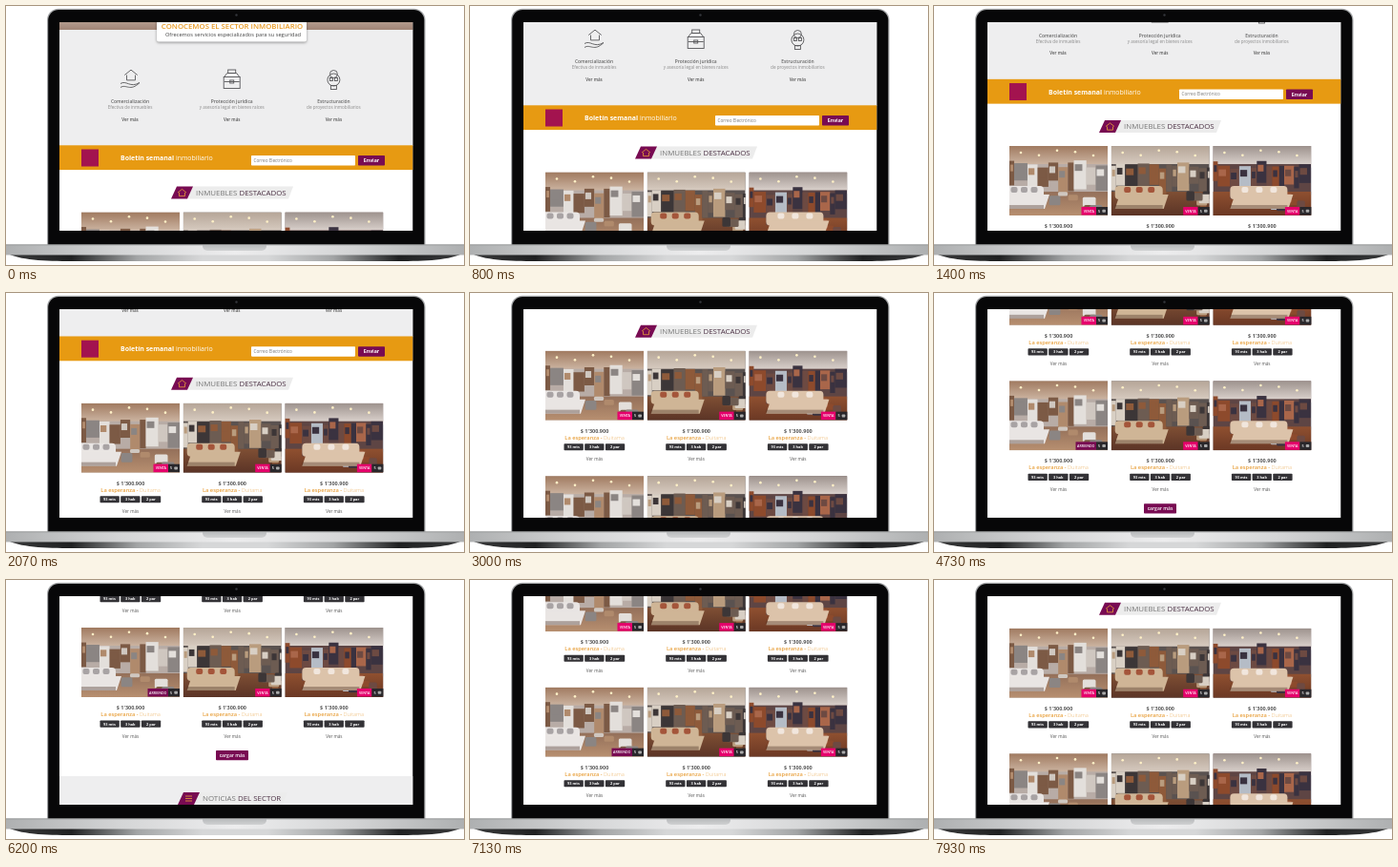
Write an HTML page with a canvas that moves like this. It is 480 px wide and 272 px high and loops after 8 s.

```html
<!DOCTYPE html>
<html lang="es">
<head>
<meta charset="utf-8">
<title>Inmuebles</title>
<style>
html, body { margin: 0; width: 100%; height: 100%; overflow: hidden; background: #fff; }
canvas { display: block; width: 480px; height: 272px; }
</style>
</head>
<body>
<canvas id="stage" width="480" height="272"></canvas>
<script>
const g = document.getElementById('stage').getContext('2d');
const LOOP = 8000, TICKS = 120, STEP = LOOP / TICKS;
const PURPLE = '#780b52', PINK = '#e6006c', ORANGE = '#e79a12', DARK = '#333236', GREY = '#eeeeef';
const SCREEN = { x: 56, y: 17, w: 370.5, h: 219 };
const CARD = { w: 103, h: 73, dx: 106.7, dy: 131.5 };
const columnX = i => 130.5 + i * CARD.dx;

// Scroll: time and place of the first row of cards
const PATH = [[0, 216.5], [800, 174.5], [2070, 115.5], [3870, 7.5], [4730, -39],
  [5700, -92], [6200, -81.5], [7930, 50.5]];

function slope(i) {
  const a = PATH[i], b = PATH[i + 1];
  return a && b ? (b[1] - a[1]) / (b[0] - a[0]) : undefined;
}

function tangent(i) {
  const a = slope(i - 1) ?? slope(i), b = slope(i) ?? a;
  return a * b <= 0 ? 0 : 2 * a * b / (a + b);
}

function scrollAt(t) {
  let i = 0;
  while (i < PATH.length - 2 && t > PATH[i + 1][0]) i++;
  const [t0, y0] = PATH[i], [t1, y1] = PATH[i + 1];
  const d = t1 - t0, u = (t - t0) / d, v = 1 - u;
  return y0 * (1 + 2 * u) * v * v + d * tangent(i) * u * v * v
    + y1 * u * u * (3 - 2 * u) - d * tangent(i + 1) * u * u * v;
}

function rect(x, y, w, h, color) {
  g.fillStyle = color;
  g.fillRect(x, y, w, h);
}

function round(x, y, w, h, r, color) {
  g.fillStyle = color;
  g.beginPath();
  g.roundRect(x, y, w, h, r);
  g.fill();
}

function slanted(x, y, w, h, lean, color) {
  g.fillStyle = color;
  g.beginPath();
  g.moveTo(x + lean, y);
  g.lineTo(x + w, y);
  g.lineTo(x + w - lean, y + h);
  g.lineTo(x, y + h);
  g.fill();
}

function line(...p) {
  g.beginPath();
  for (let i = 0; i < p.length; i += 2) g.lineTo(p[i], p[i + 1]);
  g.stroke();
}

function dot(x, y, r, color) {
  g.fillStyle = color;
  g.beginPath();
  g.arc(x, y, r, 0, 7);
  g.fill();
}

function fill(gradient, colors) {
  colors.forEach((c, i) => gradient.addColorStop(i / (colors.length - 1), c));
  return gradient;
}
const down = (y0, y1, ...colors) => fill(g.createLinearGradient(0, y0, 0, y1), colors);
const across = (...colors) => fill(g.createLinearGradient(0, 0, 480, 0), colors);

function clipped(x, y, w, h, paint) {
  g.save();
  g.beginPath();
  g.rect(x, y, w, h);
  g.clip();
  paint();
  g.restore();
}

// Runs are [text, weight, colour]; y is the middle of the capitals
function text(x, y, size, align, ...runs) {
  const font = w => `${w} ${size}px "Open Sans", "Noto Sans", sans-serif`;
  const widths = runs.map(([s, w]) => (g.font = font(w), g.measureText(s).width));
  if (align === 'center') x -= widths.reduce((a, b) => a + b) / 2;
  runs.forEach(([s, w, color], i) => {
    g.font = font(w);
    g.fillStyle = color;
    g.fillText(s, x, y + size * 0.36);
    x += widths[i];
  });
}

function seeded(n) {
  return () => (n = n * 16807 % 2147483647) / 2147483647;
}

const ROOMS = [
  { seed: 411, ceiling: ['#a07a60', '#cbb3a0'], wall: '#b8aca6', floor: ['#94705a', '#b78f70'],
    tones: ['#8b8583', '#e3dfdb', '#7c5a45', '#cfc7c0', '#b08a6c'],
    seat: { x: -6, w: 42, color: '#e9e5e3', pillow: '#a8a3a4' } },
  { seed: 902, ceiling: ['#b5a597', '#d6cabf'], wall: '#5a5250', floor: ['#7f4f34', '#5b3426'],
    tones: ['#3c3637', '#8e5a3a', '#b99c7e', '#d8cfc4', '#6d5c52'],
    seat: { x: 4, w: 50, color: '#cfb596', pillow: '#a4553a' } },
  { seed: 77, ceiling: ['#9d928d', '#d8cfca'], wall: '#5e4544', floor: ['#8f5030', '#6b3824'],
    tones: ['#3a3240', '#8d4a2c', '#b5bcc6', '#6d4a42', '#a9664a'],
    seat: { x: 18, w: 60, color: '#dcc3aa', pillow: '#f1e6dd' } }
];

function room({ seed, ceiling, wall, floor, tones, seat }) {
  const rnd = seeded(seed), { w, h } = CARD;
  rect(0, 0, w, h, wall);
  rect(0, 0, w, 19, down(0, 19, ...ceiling));
  rect(0, 48, w, h - 48, down(48, h, ...floor));
  for (let x = 0; x < w;) {
    const pw = 5 + rnd() * 9, top = 15 + rnd() * 9;
    rect(x, top, pw, 18 + rnd() * 14, tones[Math.floor(rnd() * tones.length)]);
    rect(x + 1, top + 4, pw * 0.6, 7, tones[Math.floor(rnd() * tones.length)]);
    x += pw;
  }
  for (let i = 0; i < 6; i++) {
    round(40 + rnd() * 56, 46 + rnd() * 18, 6 + rnd() * 8, 4 + rnd() * 6, 1.5, tones[i % tones.length]);
  }
  round(seat.x, 42, seat.w, 14, 4, seat.color);
  slanted(seat.x, 51, seat.w + 6, 15, 5, seat.color);
  rect(seat.x, 62, seat.w, 4, 'rgba(60,35,25,.35)');
  for (let i = 1; i < 4; i++) round(seat.x + i * seat.w / 4 - 3, 43, 7, 6, 2, seat.pillow);
  for (let i = 0; i < 5; i++) dot(12 + i * 19, 7 + 3 * Math.sin(i * 2), 1.3, '#fff0c6');
}

function pills(cx, y) {
  ['93 mts', '3 hab', '2 par'].forEach((s, i) => {
    const x = cx - 32 + i * 21.7;
    round(x, y, 20.3, 7.2, 0.8, DARK);
    text(x + 10, y + 3.6, 3.9, 'center', [s, 700, '#fff']);
  });
}

function card(col, y, rented) {
  const cx = columnX(col), x = cx - CARD.w / 2, right = x + CARD.w;
  g.save();
  g.translate(x, y);
  clipped(0, 0, CARD.w, CARD.h, () => room(ROOMS[col]));
  g.restore();

  const w = rented ? 21.5 : 15.5, mark = right - 12;
  rect(mark - w, y + 64, w, 8.5, rented ? PURPLE : PINK);
  rect(mark, y + 64, 12, 8.5, '#29272b');
  text(mark - w / 2, y + 68.3, 3.6, 'center', [rented ? 'ARRIENDO' : 'VENTA', 600, '#fff']);
  text(mark + 2, y + 68.3, 3.8, 'left', ['5', 600, '#fff']);
  round(mark + 6.3, y + 66.8, 3.6, 3, 0.8, '#aaa');

  text(cx, y + 84, 5.5, 'center', ["$ 1'300.900", 700, '#555']);
  text(cx, y + 91, 5.7, 'center', ['La esperanza - ', 600, '#e8a03c'], ['Duitama', 300, '#ecb468']);
  pills(cx, y + 97.5);
  text(cx, y + 114, 4.6, 'center', ['Ver más', 400, '#555']);
}

function heading(x, y, w, light, strong, icon) {
  slanted(x + 17, y, w - 17, 13, 5, '#ececec');
  slanted(x, y, 23, 13, 6, PURPLE);
  pen('#e9a339', 0.8);
  icon(x + 11.5, y + 6.5);
  text(x + 26, y + 6.6, 7.9, 'left', [light + ' ', 400, '#777'], [strong, 500, '#4d3346']);
}

function pen(color, width) {
  g.strokeStyle = color;
  g.lineWidth = width;
}

function home(x, y, s = 3) {
  line(x - s * 1.5, y, x, y - s * 1.2, x + s * 1.5, y);
  line(x - s, y, x - s, y + s * 1.2, x + s, y + s * 1.2, x + s, y);
}

function lines(x, y) {
  for (let d = -2.5; d < 3; d += 2.5) line(x - 3.5, y + d, x + 3.5, y + d);
}

function housing(x, y) {
  home(x + 1, y - 4, 4.5);
  for (const d of [5, 9]) {
    g.beginPath();
    g.moveTo(x - 10, y + d);
    g.bezierCurveTo(x - 4, y + d - 4, x, y + d + 5, x + 10, y + 4);
    g.stroke();
  }
}

function briefcase(x, y) {
  g.strokeRect(x - 8.5, y - 2, 17, 12);
  line(x - 8, y - 2, x - 5, y - 6, x + 5, y - 6, x + 8, y - 2);
  g.strokeRect(x - 4, y - 9.5, 8, 3.5);
  line(x - 8, y + 3, x + 8, y + 3);
  g.strokeRect(x - 2, y + 1.5, 4, 3);
}

function idea(x, y) {
  for (const [dy, r] of [[-5, 4], [1, 6.5]]) {
    g.beginPath();
    g.arc(x, y + dy, r, 0, 7);
    g.stroke();
  }
  for (const side of [-1, 1]) g.strokeRect(x + side * 2.5 - 1.5, y - 1, 3, 3);
  g.strokeRect(x - 3, y + 7, 6, 4);
}

const SERVICES = [
  [housing, 'Comercialización', 'Efectiva de inmuebles'],
  [briefcase, 'Protección jurídica', 'y asesoría legal en bienes raíces'],
  [idea, 'Estructuración', 'de proyectos inmobiliarios']
];

function band(y, h, color) {
  rect(SCREEN.x, y, SCREEN.w, h, color);
}

function services(y) {
  band(y - 230, 39, down(y - 205, y - 191, '#bda89b', '#a18475'));
  band(y - 191.5, 122, GREY);
  g.save();
  g.shadowColor = 'rgba(0,0,0,.4)';
  g.shadowBlur = 3;
  g.shadowOffsetY = 1;
  round(158, y - 207, 157, 28, 2, '#fff');
  g.restore();
  text(237, y - 195.2, 7.8, 'center', ['CONOCEMOS EL SECTOR INMOBILIARIO', 600, '#e99b24']);
  text(238, y - 187, 5.7, 'center',
    ['Ofrecemos servicios especializados para su seguridad', 400, '#444']);

  SERVICES.forEach(([icon, title, detail], i) => {
    const x = columnX(i) - 0.5;
    pen('#57575a', 0.9);
    icon(x, y - 140);
    text(x, y - 116.3, 4.9, 'center', [title, 600, '#666']);
    text(x, y - 110, 4.6, 'center', [detail, 400, '#8a8a8a']);
    text(x, y - 97.5, 4.5, 'center', ['Ver más', 600, '#555']);
  });
}

function newsletter(y) {
  band(y - 70.2, 25.8, ORANGE);
  rect(79, y - 66, 18, 18, '#a3134f');
  text(120, y - 56.7, 6.95, 'left', ['Boletín semanal ', 700, '#fff'], ['inmobiliario', 400, '#fff']);
  round(257, y - 59.5, 109, 10.5, 0.8, '#fff');
  text(259.5, y - 54.3, 4.7, 'left', ['Correo Electrónico', 400, '#777']);
  round(369, y - 59.5, 28, 10.5, 0.8, PURPLE);
  text(383, y - 54.3, 5.2, 'center', ['Enviar', 700, '#fff']);
}

function page(y) {
  band(SCREEN.y, SCREEN.h, '#fff');
  services(y);
  newsletter(y);
  heading(173, y - 27, 128, 'INMUEBLES', 'DESTACADOS', home);
  for (let col = 0; col < 3; col++) {
    card(col, y, false);
    card(col, y + CARD.dy, col === 0);
  }
  round(220, y + 260.5, 34, 10.3, 0.8, PURPLE);
  text(237, y + 265.6, 5, 'center', ['cargar más', 600, '#fff']);
  band(y + 287.5, 80, GREY);
  heading(180, y + 304.5, 115, 'NOTICIAS', 'DEL SECTOR', lines);
}

function laptop() {
  round(43, 2.8, 396.5, 252, [12, 12, 0, 0], '#a5a7a9');
  round(44.2, 4, 394.1, 250, [11, 11, 0, 0], '#070708');
  dot(241.5, 9.5, 1.2, '#34363b');

  // Underside: dark towards both ends
  g.fillStyle = across('#3a3b3c', '#1f2021', '#a2a4a5', '#d6d7d8', '#d6d7d8', '#a2a4a5', '#1f2021', '#3a3b3c');
  g.beginPath();
  g.moveTo(0, 259);
  g.bezierCurveTo(14, 267, 40, 268, 70, 268);
  g.lineTo(410, 268);
  g.bezierCurveTo(440, 268, 466, 267, 480, 259);
  g.fill();
  rect(0, 250.5, 480, 11, across('#aeb0b1', '#d4d5d6', '#ededee', '#d4d5d6', '#aeb0b1'));
  rect(0, 250.5, 480, 0.8, '#8f9192');
  round(206, 251, 67, 6, [0, 0, 5, 5], down(250, 257, '#b4b6b8', '#d0d1d2'));
}

function draw(t) {
  const tick = Math.floor((t + 3.4) / STEP) % TICKS;
  rect(0, 0, 480, 272, '#fff');
  laptop();
  clipped(SCREEN.x, SCREEN.y, SCREEN.w, SCREEN.h, () => page(scrollAt(tick * STEP)));
}

const start = performance.now();
function frame() {
  draw((performance.now() - start) % LOOP);
  requestAnimationFrame(frame);
}
frame();
</script>
</body>
</html>
```
